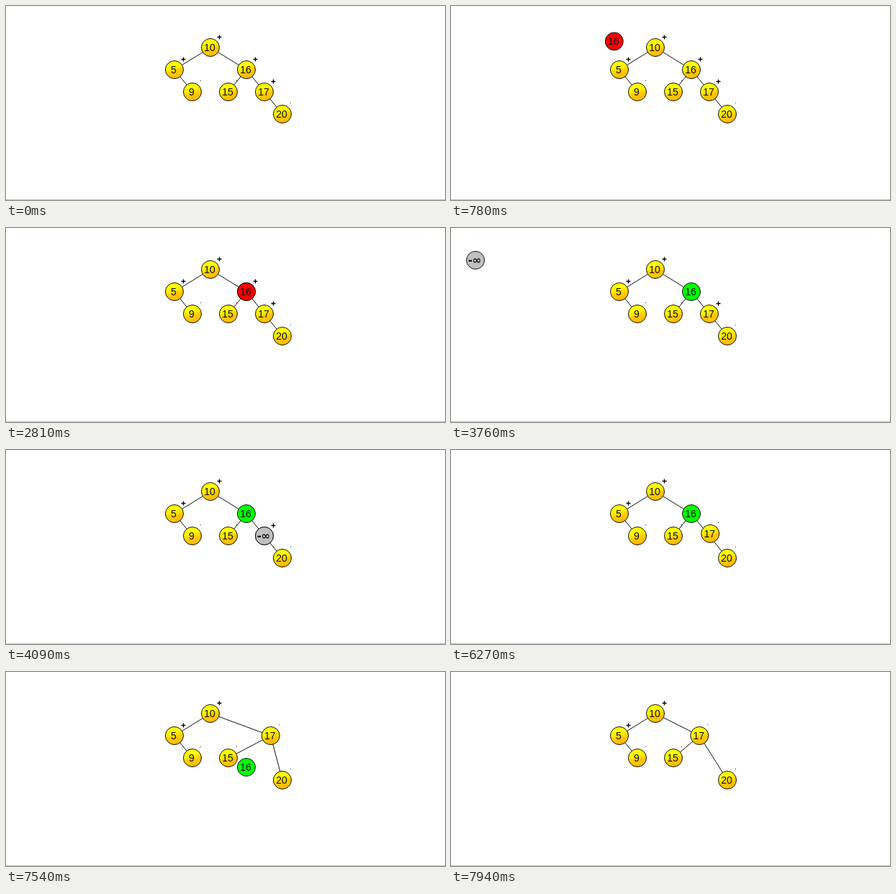
Animation, 610 px wide and 271 px high, one loop 8000 ms. Source, as an HTML page:

```html
<!DOCTYPE html>
<html lang="en">
<head>
<meta charset="utf-8">
<title>AVL tree deletion</title>
<style>
  html, body { margin: 0; width: 100%; height: 100%; overflow: hidden; background: #fff; }
  svg { display: block; width: 610px; height: 271px; }
  text { font: 14px "Liberation Sans", Arial, sans-serif; text-anchor: middle; fill: #111; }
  .inf { font: bold 15px "DejaVu Sans", sans-serif; }
  circle, line { stroke: #111; }
  path { stroke: #000; stroke-width: 1.3; }
</style>
</head>
<body>
<svg viewBox="0 0 610 271">
  <defs>
    <linearGradient id="gold" x1=".35" y1="0" x2=".65" y2="1">
      <stop offset=".3" stop-color="#ff0"/>
      <stop offset=".6" stop-color="#ffcc00"/>
      <stop offset="1" stop-color="#ffb400"/>
    </linearGradient>
  </defs>
  <g id="scene"></g>
  <rect y="270" width="610" height="1" fill="#c0c0c0"/>
</svg>
<script>
const LOOP = 8000;
const GOLD = 'url(#gold)', RED = '#f00', GREEN = '#0f0', GRAY = '#c0c0c0';
const scene = document.getElementById('scene');

const P = {
  five: [234, 89], nine: [259, 120], ten: [284, 58],
  fifteen: [309, 120], sixteen: [334, 89],
  seventeen: [359, 120], twenty: [384, 151]
};
const RAISED = [371.5, 89];

const mix = (a, b, u) => a.map((v, i) => v + (b[i] - v) * u);

const edge = (a, b) =>
  `<line x1="${a[0]}" y1="${a[1]}" x2="${b[0]}" y2="${b[1]}"/>`;

function node(label, [x, y], fill = GOLD) {
  const cls = label === '-∞' ? ' class="inf"' : '';
  return `<circle cx="${x}" cy="${y}" r="12.5" fill="${fill}"/>` +
    `<text${cls} x="${x - 1}" y="${y + 5}">${label}</text>`;
}

const plus = ([x, y]) =>
  `<path d="M${x + 9.5} ${y - 14.5}h6M${x + 12.5} ${y - 17.5}v6"/>`;

const dot = ([x, y]) =>
  `<rect x="${x + 11}" y="${y - 16}" width="1" height="1" fill="#333"/>`;

// Number of steps taken since start; the first one happens at start itself.
const steps = (t, start, gap, max) =>
  t < start ? 0 : Math.min(max, 1 + Math.floor((t - start + 4) / gap));

function draw(t) {
  const search = steps(t, 500, 66, 6);
  const descend = steps(t, 2220, 65.6, 10);
  const blank = steps(t, 3760, 66, 6);
  const raise = steps(t, 6270, 65.6, 10);
  const slide = steps(t, 7540, 66.7, 7);
  const found = t >= 3490;

  const succ = slide ? mix(RAISED, P.sixteen, slide / 10)
                     : mix(P.seventeen, RAISED, raise / 10);
  const joint = slide ? succ : P.seventeen;

  let out = edge(P.ten, P.five) + edge(P.five, P.nine);
  out += slide
    ? edge(P.ten, succ) + edge(succ, P.fifteen)
    : edge(P.ten, P.sixteen) + edge(P.sixteen, P.fifteen) + edge(P.sixteen, joint);
  out += edge(joint, P.twenty);

  out += plus(P.ten) + plus(P.five) + dot(P.nine) + dot(P.fifteen) + dot(P.twenty);
  if (!found) out += plus(P.sixteen);
  out += raise ? dot(succ) : plus(P.seventeen);

  out += node(10, P.ten) + node(5, P.five) + node(9, P.nine) +
    node(15, P.fifteen) + node(20, P.twenty);
  if (!slide) out += node(16, P.sixteen, found ? GREEN : GOLD);
  out += node(17, succ);

  if (search && !found) {
    const at = descend ? mix(P.ten, P.sixteen, descend / 10)
                       : mix([-2, 15], P.ten, (search - 1) / 5);
    out += node(16, at, RED);
  }
  if (blank && !raise) {
    out += node('-∞', mix([34, 45], P.seventeen, (blank - 1) / 5), GRAY);
  }
  if (slide) out += node(16, [P.sixteen[0], P.sixteen[1] + 44 * slide], GREEN);
  return out;
}

let shown = '';
function tick() {
  const next = draw(performance.now() % LOOP);
  if (next !== shown) scene.innerHTML = shown = next;
  requestAnimationFrame(tick);
}
tick();
</script>
</body>
</html>
```
